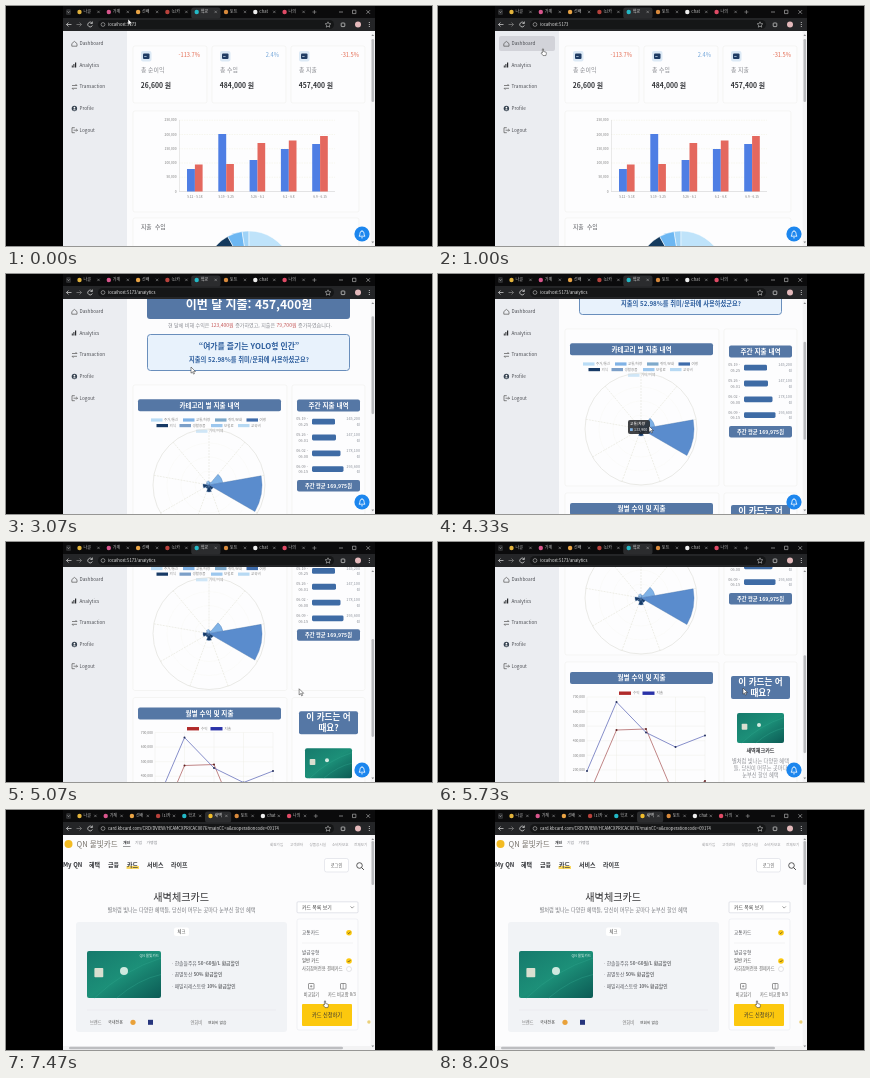
These frames come from a looping animation (426 by 240 pixels, 8270 ms). An HTML page:

```html
<!DOCTYPE html>
<html lang="ko">
<head>
<meta charset="utf-8">
<title>Account book walkthrough</title>
<style>
html, body { margin: 0; width: 100%; height: 100%; overflow: hidden; background: #000; }
svg { display: block; width: 100vw; height: 100vh; }
text { font-family: "Noto Sans CJK KR", "Noto Sans CJK", "Noto Sans", sans-serif; white-space: pre; }
</style>
</head>
<body>
<svg id="stage" viewBox="0 0 426 240"></svg>
<script>
const LOOP = 8270, STEP = 1000 / 15;
const OPEN_ANALYTICS = 2130, OPEN_TAB = 7200, PAINT_TAB = 7400;
const STEEL = '#5577a5', NAVY = '#1f3b63', INK = '#303236', GREY = '#85878d', YELLOW = '#fcc80e';

// Drawing helpers: every text is placed by its vertical middle.
const rect = (x, y, w, h, fill, r = 0, more = '') =>
  `<rect x="${x}" y="${y}" width="${w}" height="${h}" rx="${r}" fill="${fill}" ${more}/>`;
const circle = (x, y, r, fill, more = '') =>
  `<circle cx="${x}" cy="${y}" r="${r}" fill="${fill}" ${more}/>`;
const path = (d, fill, more = '') => `<path d="${d}" fill="${fill}" ${more}/>`;
const line = (d, color, width = 0.6, more = '') =>
  path(d, 'none', `stroke="${color}" stroke-width="${width}" ${more}`);
const text = (x, y, size, fill, s, anchor = 'start', weight = 400) =>
  `<text x="${x}" y="${y + size * 0.36}" font-size="${size}" fill="${fill}" text-anchor="${anchor}" font-weight="${weight}">${s}</text>`;
const mid = (x, y, size, fill, s, weight) => text(x, y, size, fill, s, 'middle', weight);
const end = (x, y, size, fill, s, weight) => text(x, y, size, fill, s, 'end', weight);
const group = (id, body, more = '') => `<g id="${id}" ${more}>${body}</g>`;
const list = (items, fn) => items.map(fn).join('');
const frame = (x, y, w, h) => rect(x, y, w, h, '#fdfdfe', 2, 'stroke="#f0f0ed" stroke-width=".6"');
const polar = (cx, cy, r, deg) => {
  const a = deg * Math.PI / 180;
  return `${(cx + r * Math.cos(a)).toFixed(2)} ${(cy + r * Math.sin(a)).toFixed(2)}`;
};
const slice = (cx, cy, r, a, b, fill, more) =>
  path(`M${cx} ${cy}L${polar(cx, cy, r, a)}A${r} ${r} 0 0 1 ${polar(cx, cy, r, b)}Z`, fill, more);

function tabStrip(id, pitch, active, tabs) {
  return group(id, list(tabs, ([color, label], i) => {
    const x = 68 + i * pitch, on = i === active;
    return (on ? rect(x, 1.5, pitch, 11, '#2b2c2e', 2.5) : '') +
      circle(x + 5.5, 6, 2.2, color) +
      text(x + 9.5, 6, 4, on ? '#f2f2f2' : '#c4c4c4', label) +
      line(`M${x + pitch - 6} 4.7l2.4 2.4m0-2.4l-2.4 2.4`, '#a8a8a8', 0.5);
  }) + line(`M${72 + pitch * tabs.length} 6h4m-2-2v4`, '#bbb', 0.5));
}

function chrome() {
  const tabs = [['#e2b33c', '나글'], ['#d9568d', '가계'], ['#eaa445', '선배'], ['#b8423c', '(1)카'],
    ['#23b9c6', '학교'], ['#d98a3c', '토트'], ['#eeeeee', 'Chat'], ['#e04b66', '나의']];
  const more = [...tabs.slice(0, 5), ['#f0bd2c', '스타일'.slice(0, 1) + '체'], ...tabs.slice(5)];
  more[5][1] = '새벽';
  return rect(57, 0, 312, 13, '#0b0b0c') + rect(57, 12, 312, 13, '#242527') +
    rect(60, 3, 5, 6, '#2b2c2e', 1.5) + line('M61.3 5.4l1.2 1.2l1.2-1.2', '#ddd', 0.5) +
    tabStrip('tabsA', 29.3, 4, tabs) + tabStrip('tabsB', 26.2, 5, more) +
    line('M333 6h4M346.5 4.2h3.4v3.4h-3.4zM360.4 4.2l3.6 3.6m0-3.6l-3.6 3.6', '#d4d4d4', 0.55) +
    line('M65.5 18.5h-5m2-2l-2 2l2 2', '#ddd', 0.7) +
    line('M70.5 18.5h5m-2-2l2 2l-2 2', '#888', 0.7) +
    line('M86 17a2.4 2.4 0 1 0 .4 2.4M86.4 15.5v2h-2', '#ddd', 0.7) +
    rect(92, 14, 236, 9, '#151617', 4.5) + circle(97, 18.5, 1.9, 'none', 'stroke="#bbb" stroke-width=".6"') +
    `<text id="url" x="102" y="20" font-size="4.2" fill="#e4e4e4"></text>` +
    path('M322 15.8l.8 1.8l2 .2l-1.5 1.4l.4 2l-1.7-1l-1.7 1l.4-2l-1.5-1.4l2-.2z', 'none', 'stroke="#ddd" stroke-width=".5"') +
    rect(335.2, 17, 3.6, 3.6, 'none', 0.6, 'stroke="#ddd" stroke-width=".7"') +
    circle(352, 18.5, 3, '#e4b9bb') + list([16.5, 18.5, 20.5], y => circle(363.3, y, 0.55, '#ddd'));
}

const MENU = ['Dashboard', 'Analytics', 'Transaction', 'Profile', 'Logout'];
const menuY = i => 37.4 + i * 21.7;

function sidebar() {
  const icons = [
    line('M65.8 37.6l2.6-2.2l2.6 2.2v2.6h-5.2z', '#555', 0.7),
    path('M65.8 61.4v-2h1v2zm1.6 0v-3.3h1v3.3zm1.6 0v-5h1.2v5z', '#26282c'),
    line('M66 79.5h5l-1.4-1.4M71 82.3h-5l1.4 1.4', '#555', 0.7),
    circle(68.4, 102.5, 2.7, '#34414f') + circle(68.4, 101.7, 0.9, '#fff') + path('M66.7 104.2q1.7-2 3.4 0z', '#fff'),
    line('M68.8 121.7h-2.8v5h2.8M67.5 124.2h4m-1.3-1.3l1.3 1.3l-1.3 1.3', '#555', 0.7)
  ];
  return rect(57, 25, 64, 215, '#ebedf1') + list(MENU, (name, i) =>
    rect(61, menuY(i) - 7.3, 56, 15, '#d2d3d9', 2, `id="menu${i}"`) +
    icons[i] + text(73.5, menuY(i), 4.7, '#4c4e54', name));
}

function dashboard() {
  const cards = [
    [127, '총 순이익', '26,600 원', '-113.7%', '#e3694f', 194],
    [206, '총 수입', '484,000 원', '2.4%', '#6fa3d8', 273],
    [285, '총 지출', '457,400 원', '-31.5%', '#e3694f', 353]
  ];
  const bars = [['5.12 - 5.18', 163, 158.5], ['5.19 - 5.25', 128, 158], ['5.26 - 6.1', 154, 137],
    ['6.2 - 6.8', 143, 134.5], ['6.9 - 6.15', 138, 130]];
  const base = 185.5;
  return list(cards, ([x, name, sum, rate, color, right]) =>
    frame(x, 40, 74, 57) +
    rect(x + 8, 45, 10.5, 10.5, '#dce9f5', 2) + rect(x + 10, 47.5, 6.5, 5.5, NAVY, 1) +
    line(`M${x + 11.2} 50.5h2.4`, '#cfe2f4', 0.7) +
    end(right, 48.5, 5.7, color, rate) + text(x + 8, 64, 5.9, GREY, name) +
    text(x + 7.7, 80, 6.8, INK, sum, 'start', 700)) +
    frame(127, 105, 226, 101) +
    list([0, 1, 2, 3, 4, 5], i => {
      const y = base - i * 14.25;
      return line(`M173 ${y}h156`, i ? '#eeeede' : '#c9c9c9', 0.5, i ? 'stroke-dasharray="1.5 1"' : '') +
        end(170.5, y, 3.3, '#777', i ? i * 50 + ',000' : '0');
    }) +
    line(`M173.5 114v${base - 114}`, '#d5d5d5', 0.5) +
    list(bars, ([label, a, b], i) => {
      const x = 181 + i * 31.3;
      return rect(x, a, 7.9, base - a, '#4e7ee4') + rect(x + 7.9, b, 7.7, base - b, '#e4685e') +
        mid(x + 7.8, 190.8, 3.2, '#777', label);
    }) +
    frame(127, 212, 226, 60) + text(135, 220.5, 5.8, '#55575c', '지출  수입') +
    list([[-152, -119, '#143a5e'], [-119, -99, '#6db7f2'], [-99, -90, '#9ed2f7'], [-90, -25, '#bfe3fa']],
      ([a, b, c]) => slice(243, 269, 44, a, b, c, 'stroke="#fff" stroke-width=".5"'));
}

const heading = (x, y, w, s) => rect(x, y, w, 12, STEEL, 2) + mid(x + w / 2, y + 6, 6.6, '#fff', s, 700);

function pie() {
  const cx = 203, cy = 211, R = 56;
  const legend = [
    [145, 146, '#b9dcf6', '주거/통신'], [177, 146, '#7fb2e6', '교통/차량'], [209, 146, '#7ea9cb', '취미/문화'], [240.5, 146, '#3f6cab', '여행'],
    [150.5, 151.6, '#173a66', '외식'], [173.5, 151.6, '#7c9fc8', '생활용품'], [205, 151.6, '#9cc7ee', '보험료'], [232, 151.6, '#b7d9f3', '교육비'],
    [190, 157.2, '#cfe6f7', '기타/이체']
  ];
  const radii = [3, 14, 53, 5, 7, 4, 6, 3, 4];
  const colors = ['#86b7e8', '#7fb2e6', '#5a8ccd', '#173a66', '#173a66', '#26486f', '#173a66', '#7c9fc8', '#9cc7ee'];
  return list(legend, ([x, y, c, s]) => rect(x, y - 1.6, 11.5, 3.2, c) + text(x + 13, y, 3.5, '#8a8a8a', s)) +
    list([0.25, 0.5, 0.75], k => circle(cx, cy, R * k, 'none', 'stroke="#f6f6f2" stroke-width=".4"')) +
    circle(cx, cy, R, 'none', 'stroke="#dcdcd6" stroke-width=".6"') +
    list(radii, (r, i) => line(`M${cx} ${cy}L${polar(cx, cy, R, i * 40 - 90)}`, '#deded0', 0.5, 'stroke-dasharray="2 1"')) +
    list(radii, (r, i) => slice(cx, cy, r, i * 40 - 90, i * 40 - 50, colors[i], 'stroke="#3f6cab" stroke-width=".3"'));
}

function weekly() {
  const rows = [['05.19 -', '05.25', 23, '145,200'], ['05.26 -', '06.01', 24, '147,100'],
    ['06.02 -', '06.08', 28.5, '178,100'], ['06.09 -', '06.15', 31.5, '193,600']];
  return heading(291, 125.5, 63, '주간 지출 내역') + list(rows, ([a, b, w, sum], i) => {
    const y = 145 + i * 15.8;
    return end(302, y, 3.8, GREY, a) + end(302, y + 5.6, 3.8, GREY, b) +
      rect(306, y - 0.2, w, 5.8, '#3e6ba5', 1.4) +
      end(354, y, 3.8, '#8c929c', sum) + end(354, y + 5.6, 3.8, '#8c929c', '원');
  }) + rect(291, 206, 63, 11.5, STEEL, 2) + mid(322.5, 211.7, 5.2, '#fff', '주간 평균 169,975원', 700);
}

function monthly() {
  const xs = [149, 178.5, 208, 237.5, 267];
  const plot = (ys, c) => line('M' + ys.map((y, i) => `${xs[i]} ${y}`).join('L'), c, 0.65) +
    list(ys, (y, i) => circle(xs[i], y, 1, c === '#a04444' ? '#5f2022' : '#25305f'));
  return heading(132, 285, 143, '월별 수익 및 지출') +
    rect(181, 304.5, 12, 3.4, '#b02a2a') + text(195, 306, 3.6, '#888', '수익') +
    rect(204.5, 304.5, 12, 3.4, '#2a32a8') + text(218.5, 306, 3.6, '#888', '지출') +
    list([0, 1, 2, 3, 4, 5, 6, 7], i => {
      const y = 412 - i * 14.57;
      return line(`M149 ${y}h118`, '#ebebe2', 0.4) + end(147, y, 3.4, '#777', i ? i + '00,000' : '0');
    }) +
    list(xs, (x, i) => line(`M${x} 310v102`, '#ebebe2', 0.4) + mid(x, 417, 3.4, '#777', '2024-0' + (i + 2))) +
    plot([412, 343, 342, 412, 394], '#a04444') + plot([384, 315, 345.5, 360, 348.5], '#4653ad');
}

const bankCard = (x, y, w, h) =>
  rect(x, y, w, h, 'url(#green)', 2) +
  line(`M${x + w * 0.1} ${y + h}Q${x + w * 0.5} ${y + h * 0.4} ${x + w} ${y + h * 0.15}M${x + w * 0.4} ${y + h}Q${x + w * 0.7} ${y + h * 0.6} ${x + w} ${y + h * 0.5}`, '#2fa58b', 0.7, 'opacity=".6"') +
  rect(x + w * 0.1, y + h * 0.36, w * 0.12, h * 0.2, '#d9dfd0', 0.8);

const promo = () =>
  rect(293, 289, 59, 23, STEEL, 2) + mid(322.5, 295, 8.6, '#fff', '이 카드는 어', 700) + mid(322.5, 305.5, 8.6, '#fff', '때요?', 700) +
  bankCard(299, 326, 47, 30) + circle(321, 338, 2, '#d5ebe2') +
  mid(322.5, 363, 5.1, INK, '새벽체크카드', 700) +
  list(['별처럼 빛나는 다양한 혜택', '들, 당신이 머무는 곳마다', '눈부신 할인 혜택'],
    (s, i) => mid(322.5, 374 + i * 7, 5.2, '#8c8e94', s)) +
  rect(305, 398, 35.5, 12, NAVY, 2) + mid(322.7, 404, 5.2, '#fff', '카드 보러가기', 700);

function analytics() {
  const red = s => `<tspan fill="#c65a5a">${s}</tspan>`;
  return rect(141, 15, 203, 30, STEEL, 3) + mid(243, 30.5, 12, '#fff', '이번 달 지출: 457,400원', 700) +
    mid(244, 51.5, 5.05, '#888a90', `현 달에 비해 수익은 ${red('123,400원')} 증가하였고, 지출은 ${red('79,700원')} 증가하였습니다.`) +
    rect(141.5, 60.5, 202, 36, '#e8f2fc', 3, 'stroke="#5b83b5" stroke-width=".9"') +
    mid(243, 72, 7.8, '#2b5c9c', '“여가를 즐기는 YOLO형 인간”', 700) +
    mid(243, 86, 6.25, '#2b5c9c', '지출의 52.98%를 취미/문화에 사용하셨군요?', 700) +
    frame(127, 111, 154, 157) + frame(286, 111, 73, 157) + frame(127, 275, 154, 150) + frame(286, 275, 73, 150) +
    heading(132, 125.3, 143, '카테고리 별 지출 내역') + pie() + monthly() +
    group('weekly', weekly()) + group('promo', promo());
}

function cardSite() {
  const check = y => circle(343, y, 2.8, YELLOW) + line(`M341.7 ${y}l1 1l1.8-2`, '#333', 0.6);
  return circle(62.5, 34, 4, '#f3bb22') + text(70.5, 34, 7.6, '#77726b', 'QN 물빛카드', 'start', 500) +
    text(117, 33, 3.9, INK, '개인', 'start', 700) + line('M117 36.5h7.5', INK, 0.5) +
    text(129, 33, 3.9, GREY, '기업') + text(140.5, 33, 3.9, GREY, '가맹점') +
    list([[264, '회원가입'], [284, '고객센터'], [303.5, '상품공시실'], [326, '소비자보호'], [348, '전체보기']],
      ([x, s]) => text(x, 34.5, 3.6, '#99999c', s)) +
    rect(120.5, 56, 12.5, 3, '#fbd960') +
    list([[57, 'My QN'], [83, '혜택'], [102, '금융'], [121, '카드'], [141, '서비스'], [165, '라이프']],
      ([x, s]) => text(x, 55, 6, INK, s, 'start', 700)) +
    rect(318.5, 48.5, 24, 13.5, '#fff', 2, 'stroke="#d9dbe2" stroke-width=".6"') + mid(330.5, 55.3, 4.2, '#555', '로그인') +
    circle(353.5, 55.5, 2.8, 'none', 'stroke="#333" stroke-width=".8"') + line('M355.6 57.6l2.3 2.3', '#333', 0.9) +
    mid(175.2, 87.5, 10.1, '#2b2b2d', '새벽체크카드', 500) +
    mid(175.5, 100.5, 5.2, '#77797e', '별처럼 빛나는 다양한 혜택들, 당신이 머무는 곳마다 눈부신 할인 혜택') +
    rect(291, 91.8, 61, 11, '#fff', 1, 'stroke="#cfd0da" stroke-width=".6"') +
    text(296, 97.3, 4.9, '#444', '카드 목록 보기') + line('M344.5 96.4l1.7 1.7l1.7-1.7', '#555', 0.6) +
    rect(70, 112, 211, 110, '#f1f3f6', 3) + rect(168, 117.5, 15, 8.5, '#fff', 2) + mid(175.5, 121.8, 4.3, '#555', '체크') +
    bankCard(81, 141, 74, 47) + circle(118, 161, 4, '#cfe9df') + end(153, 145.5, 3.6, '#dff3ec', 'QN 물빛카드') +
    list([['한솔들주유', '50~60원/L 환급할인'], ['꿈별동산', '50% 환급할인'], ['패밀리레스토랑', '10% 환급할인']],
      ([a, b], i) => text(166, 153 + i * 11.6, 4.8, '#5d5f66', `· ${a} <tspan fill="#2d2f33" font-weight="500">${b}</tspan>`)) +
    line('M81 200h189', '#e0e3e8', 0.5) +
    text(84, 212.3, 4.2, '#777', '브랜드') + text(102, 212.3, 4.1, '#444', '국내전용') +
    circle(127, 212.3, 2.6, '#e9a13a') + rect(142, 209.8, 5, 5, '#26357d') +
    text(184.5, 212.3, 4.2, '#777', '연회비') + text(202, 212.3, 3.8, '#444', '연회비 없음') +
    rect(291, 109, 61, 111, '#fdfdfe', 2, 'stroke="#e8e9ee" stroke-width=".6"') +
    text(296, 122.7, 4.7, '#55575c', '교통카드') + check(122.7) + line('M296 133h51', '#e6e7eb', 0.5) +
    text(296, 142.7, 4.7, '#55575c', '발급유형') + text(296, 150.5, 4.4, '#444', '일반 카드') + check(151) +
    text(296, 158.5, 4.3, '#666', '사회참여전용 결제카드') + circle(343, 159, 2.5, '#fff', 'stroke="#d0d1d6" stroke-width=".6"') +
    rect(302.5, 173.5, 5.5, 5.5, 'none', 0.6, 'stroke="#555" stroke-width=".6"') + line('M305.2 175v2.5m-1.2-1.2h2.4', '#555', 0.5) +
    rect(334.5, 173.5, 5.5, 5.5, 'none', 0.6, 'stroke="#555" stroke-width=".6"') + line('M337.2 173.5v5.5', '#555', 0.5) +
    mid(305.5, 184, 4.2, '#555', '비교담기') + mid(336, 184, 4.2, '#555', '카드 비교함 0/3') +
    rect(296, 194, 50, 22, YELLOW, 1) + mid(321, 205, 5.2, '#333', '카드 신청하기', 500) +
    circle(363, 212, 1.8, '#ead07a') +
    rect(57, 236, 308, 4, '#f3f3f4') + rect(63, 236.8, 274, 2.4, '#bcbdc0', 1.2);
}

const bell = circle(356, 228, 7.6, '#1c86ee') +
  line('M353 230.2q1-1 1-3a2 2 0 0 1 4 0q0 2 1 3zM355.2 231.8h1.6M356 224.2v.8', '#fff', 0.8);
const tooltip = rect(190, 146, 22, 14, '#26282b', 2, 'opacity=".88"') +
  text(192, 150, 3.7, '#fff', '교통/차량') + rect(192, 154.2, 2.8, 2.8, '#7fb2e6') + text(196, 155.7, 3.7, '#fff', '133,900');
const arrow = path('M0 0v6.2l1.5-1.3l1 2.2l1-.5l-1-2.1h2z', '#fff', 'stroke="#222" stroke-width=".5"');
const hand = path('M-.6 0q.6-.8 1.2 0v2.5l2.4.7q.6.4.4 1.4l-.5 2h-2.8l-1.9-2.4q.2-.9 1.2-.2z', '#fff', 'stroke="#222" stroke-width=".5"');

document.getElementById('stage').innerHTML =
  '<defs><linearGradient id="green" x1="0" y1="0" x2="1" y2="1"><stop offset="0" stop-color="#167a6c"/>' +
  '<stop offset=".5" stop-color="#1c8f78"/><stop offset="1" stop-color="#0c5b55"/></linearGradient>' +
  '<clipPath id="view"><rect x="57" y="25" width="312" height="215"/></clipPath></defs>' +
  rect(0, 0, 426, 240, '#000') + rect(57, 25, 312, 215, '#fcfcfd') +
  group('content', group('app', group('dash', dashboard()) + group('stats', analytics()) + sidebar() + bell + group('tip', tooltip)) +
    group('site', cardSite()) +
    rect(364.6, 25, 4.4, 215, '#f4f4f5') + path('M365.4 30l1.4-1.8l1.4 1.8zM365.4 235.5l1.4 1.8l1.4-1.8z', '#8a8b8e') +
    rect(365.5, 33, 2.6, 63, '#b9babd', 1.3, 'id="thumb"'), 'clip-path="url(#view)"') +
  chrome() + group('cursor', group('arrow', arrow) + group('hand', hand));

const $ = id => document.getElementById(id);
const show = (id, on) => $(id).setAttribute('display', on ? 'inline' : 'none');
const move = (id, x, y) => $(id).setAttribute('transform', `translate(${x.toFixed(2)} ${y.toFixed(2)})`);

// Key rows are [time, value...]; values ease between rows.
function at(keys, t) {
  let i = keys.findIndex(k => k[0] > t);
  if (i < 0) return keys[keys.length - 1].slice(1);
  if (i === 0) return keys[0].slice(1);
  const a = keys[i - 1], b = keys[i], p = (t - a[0]) / (b[0] - a[0]), e = p * p * (3 - 2 * p);
  return a.slice(1).map((v, n) => v + (b[n + 1] - v) * e);
}
const POINTER = [[0, 122, 13], [400, 122, 14], [1500, 92, 65], [2250, 93, 65], [2800, 185, 93], [3350, 185, 93],
  [4100, 211, 152], [4600, 211, 152], [5200, 305, 146], [5900, 305, 146], [6600, 319, 191]];
const SCROLL = [[2450, -20], [2900, 0], [3250, 0], [3800, 56], [4650, 56], [5350, 155], [5850, 155], [6400, 204]];
const WEEKLY = [[3250, 0], [3800, 2], [4650, 2], [5350, 0]];
const PROMO = [[4330, -2], [5350, 0], [5850, 0], [6400, -3]];

function draw(t) {
  const [x, y] = at(POINTER, t), [scroll] = at(SCROLL, t);
  const stats = t >= OPEN_ANALYTICS, tab = t >= OPEN_TAB, site = t >= PAINT_TAB;
  show('dash', !stats);
  show('stats', stats);
  show('app', !tab);
  show('site', site);
  show('tabsA', !tab);
  show('tabsB', tab);
  show('tip', t > 4060 && t < 4660);
  move('stats', 0, -scroll);
  move('weekly', 0, at(WEEKLY, t)[0]);
  move('promo', 0, at(PROMO, t)[0]);
  move('cursor', x, y);

  const hovered = MENU.findIndex((_, i) => x > 61 && x < 117 && Math.abs(y - menuY(i)) < 7.6);
  MENU.forEach((_, i) => show('menu' + i, i === hovered));
  const pointing = hovered >= 0 || t > 6500;
  show('arrow', !pointing);
  show('hand', pointing);

  const thumb = site ? [31, 44] : stats ? [33 + (scroll + 20) * 0.458, 98] : [33, 63];
  $('thumb').setAttribute('y', thumb[0]);
  $('thumb').setAttribute('height', thumb[1]);
  $('url').textContent = tab ? 'card.kbcard.com/CRD/DVIEW/HCAMCXPRICAC0076?mainCC=a&cooperationcode=09174'
    : 'localhost:5173' + (stats ? '/analytics' : '');
}

const start = performance.now();
function tick() {
  const t = (performance.now() - start) % LOOP;
  draw(Math.floor((t + 4) / STEP) * STEP);
  requestAnimationFrame(tick);
}
draw(0);
requestAnimationFrame(tick);
</script>
</body>
</html>
```
